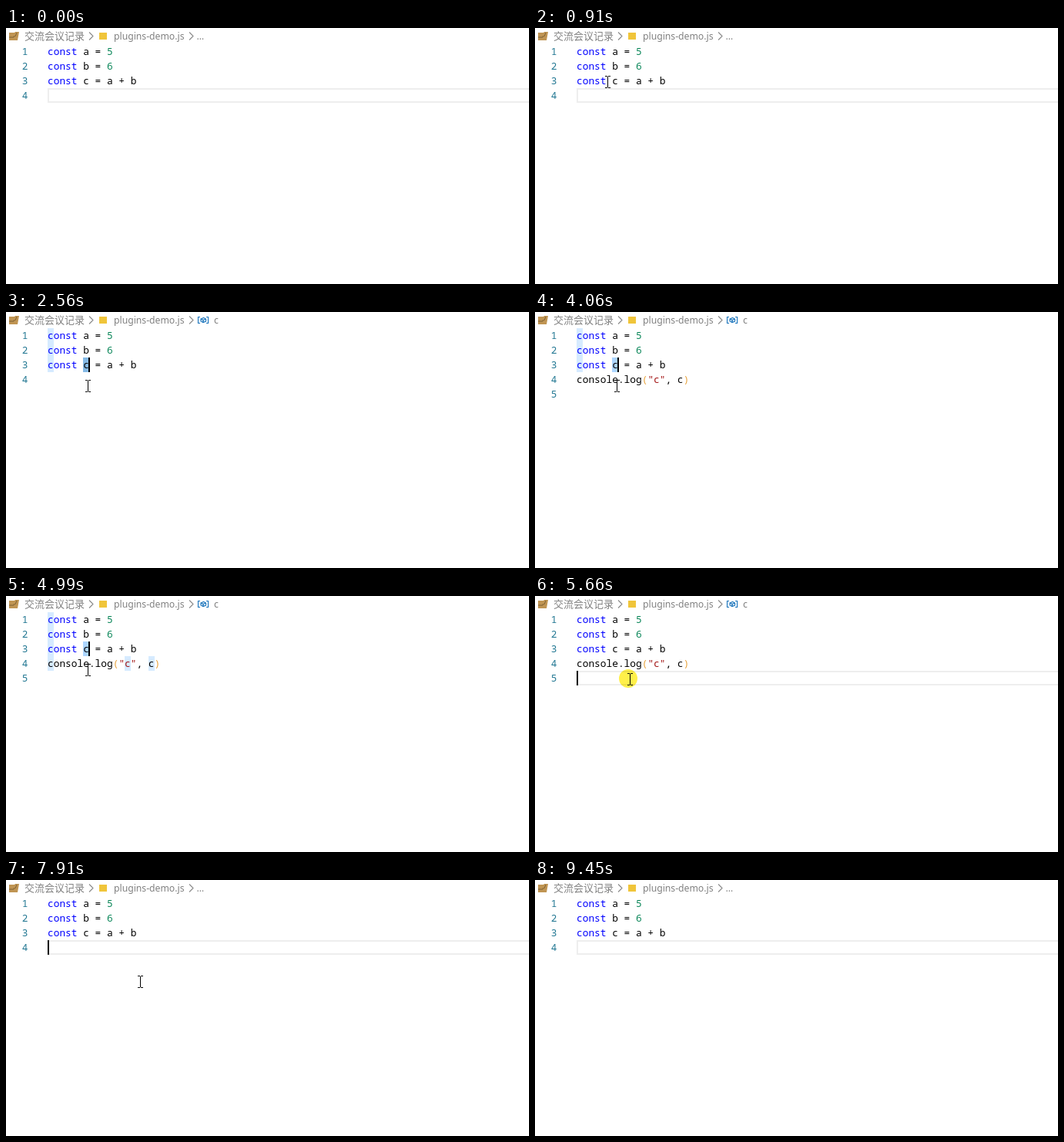
An HTML page for the animation above (9.53 s loop, 679x332 px).

```html
<!DOCTYPE html>
<html lang="zh-CN">
<head>
<meta charset="utf-8">
<title>Editor</title>
<style>
  html, body { margin: 0; width: 100%; height: 100%; overflow: hidden; background: #fff; }
  svg { display: block; }
  text { white-space: pre; }
  .code { font: 12.83px "Noto Sans Mono", monospace; }
  .crumb { font: 12.2px "Noto Sans", sans-serif; fill: #808080; }
  .cjk { font: 13px "Noto Sans CJK SC", "Noto Sans CJK", sans-serif; }
  .number { fill: #237893; text-anchor: end; }
  .keyword { fill: #00f; }
  .digit { fill: #098658; }
  .string { fill: #a31515; }
  .paren { fill: #e8a33d; }
  .chevron { fill: none; stroke: #8a8a8a; stroke-width: 1.1; }
  .match { fill: #d6ebff; }
  #click { fill: #fff04a; mix-blend-mode: multiply; }
</style>
</head>
<body>
<svg width="679" height="332" viewBox="0 0 679 332">
  <!-- breadcrumb -->
  <path d="M4 6h7l1-1h5l-2 11H4z" fill="#c09553"/>
  <path d="M11 10l-1 2H4M14 6l-2 5" fill="none" stroke="#7d6034"/>
  <text class="crumb cjk" x="24" y="15">交流会议记录</text>
  <path class="chevron" d="M108 5.5l5 5-5 5M238 5.5l5 5-5 5"/>
  <rect x="121" y="6" width="10" height="9" fill="#f0c53a"/>
  <text class="crumb" x="140" y="15">plugins-demo.js</text>
  <text class="crumb" id="dots" x="247.5" y="15">…</text>
  <g id="symbol">
    <path d="M252 6.5h-2.5v8h2.5M260 6.5h2.5v8H260M253 9l3.5-1.5 3 1.5v3L256 13.500l-3-1.500zl3 1.500 3.500-1.500M256 10.500v3" fill="none" stroke="#1f77bd" stroke-width="1.2"/>
    <text class="crumb" x="270" y="15">c</text>
  </g>

  <!-- editor -->
  <rect id="activeLine" x="55" width="640" height="17" fill="none" stroke="#eee" stroke-width="2"/>
  <g id="selection">
    <rect class="match" x="54" y="21" width="8" height="57"/>
    <rect x="100" y="59" width="8" height="19" fill="#add6ff"/>
    <rect id="occurrence" x="100" y="59" width="8" height="19" fill="#0e639c" opacity=".25"/>
    <path id="newMatches" class="match" d="M54 78h8v19h-8zM154 78h8v19h-8zM185 78h8v19h-8z"/>
  </g>
  <g class="code">
    <g id="numbers"></g>
    <text x="54" y="35"><tspan class="keyword">const</tspan> a = <tspan class="digit">5</tspan></text>
    <text x="54" y="54"><tspan class="keyword">const</tspan> b = <tspan class="digit">6</tspan></text>
    <text x="54" y="73"><tspan class="keyword">const</tspan> c = a + b</text>
    <text id="logLine" x="54" y="92">console.log<tspan class="paren">(</tspan><tspan class="string">"c"</tspan>, c<tspan class="paren">)</tspan></text>
  </g>
  <rect id="caret" width="2" height="19"/>
  <circle id="click" r="12"/>
  <path id="mouse" d="M-3-7.500h3m1 0h3M.5-7v14M-3 7.500h3m1 0h3" fill="none" stroke="#000"/>
</svg>
<script>
const LOOP = 9530;
const SELECT = 1460, INSERT = 4060, DESELECT = 5622, UNDO = 7910;
const caretToggles = [SELECT, 2080, 2560, 3020, 3570, 4430, 4990, 5550, DESELECT,
  6200, 6670, 7130, 7690, 8370, 8850, 9450];

const linear = u => u, easeOut = u => 1 - (1 - u) ** 2, easeIn = u => u * u;
const moves = [
  { from: 70, to: 910, steps: 12, x: 94, y: 70, ease: easeOut },
  { from: 1070, to: 1260, steps: 3, x: 106, y: 74, ease: linear },
  { from: 2010, to: 2390, steps: 6, x: 106, y: 96, ease: linear },
  { from: 5550, to: 5622, steps: 2, x: 123, y: 108, ease: linear },
  { from: 5700, to: 6200, steps: 8, x: 178, y: 132, ease: easeOut },
  { from: 6940, to: 6940, steps: 1, x: 174, y: 132, ease: linear },
  { from: 8700, to: 9060, steps: 6, x: 782, y: 410, ease: easeIn },
];

const el = id => document.getElementById(id);
const show = (id, on) => el(id).setAttribute("display", on ? "inline" : "none");
const set = (id, attrs) => {
  for (const name in attrs) el(id).setAttribute(name, attrs[name]);
};
const rowTop = row => 21 + 19 * row;

for (let i = 0; i < 5; i++) {
  el("numbers").insertAdjacentHTML("beforeend",
    `<text id="number${i}" class="number" x="28.500" y="${rowTop(i) + 14}">${i + 1}</text>`);
}

// The pointer advances in discrete steps, the first one at the start of a move.
function mouseAt(t) {
  let x = 622, y = 362;
  for (const m of moves) {
    if (t < m.from) break;
    const gap = (m.to - m.from) / (m.steps - 1 || 1) || 1;
    const step = Math.min(m.steps, Math.floor((t - m.from) / gap + 1e-6) + 1);
    const p = m.ease(step / m.steps);
    x += (m.x - x) * p;
    y += (m.y - y) * p;
  }
  return [Math.round(x), Math.round(y)];
}

function draw(t) {
  const within = (a, b) => t >= a && t < b;
  const inserted = within(INSERT, UNDO);
  const selected = within(1540, DESELECT);
  const onLineThree = within(SELECT, DESELECT);
  const row = onLineThree ? 2 : inserted ? 4 : 3;
  const symbolCrumb = within(1760, 5890);

  show("symbol", symbolCrumb);
  show("dots", !symbolCrumb);
  show("logLine", inserted);
  show("number4", inserted);
  show("selection", selected);
  show("occurrence", within(1760, INSERT));
  show("newMatches", t >= 4250);

  show("activeLine", !selected);
  set("activeLine", { y: rowTop(row) + 1 });
  show("caret", caretToggles.filter(time => time <= t).length % 2);
  set("caret", { x: onLineThree ? 107 : 54, y: rowTop(row) });

  const firstClick = within(SELECT, 1720);
  show("click", firstClick || within(DESELECT, 5830));
  set("click", firstClick ? { cx: 104.5, cy: 73 } : { cx: 121, cy: 107 });

  const [x, y] = mouseAt(t);
  show("mouse", within(70, 9060));
  set("mouse", { transform: `translate(${x} ${y})` });
}

const start = performance.now();
function frame() {
  draw((performance.now() - start) % LOOP);
  requestAnimationFrame(frame);
}
frame();
</script>
</body>
</html>
```
